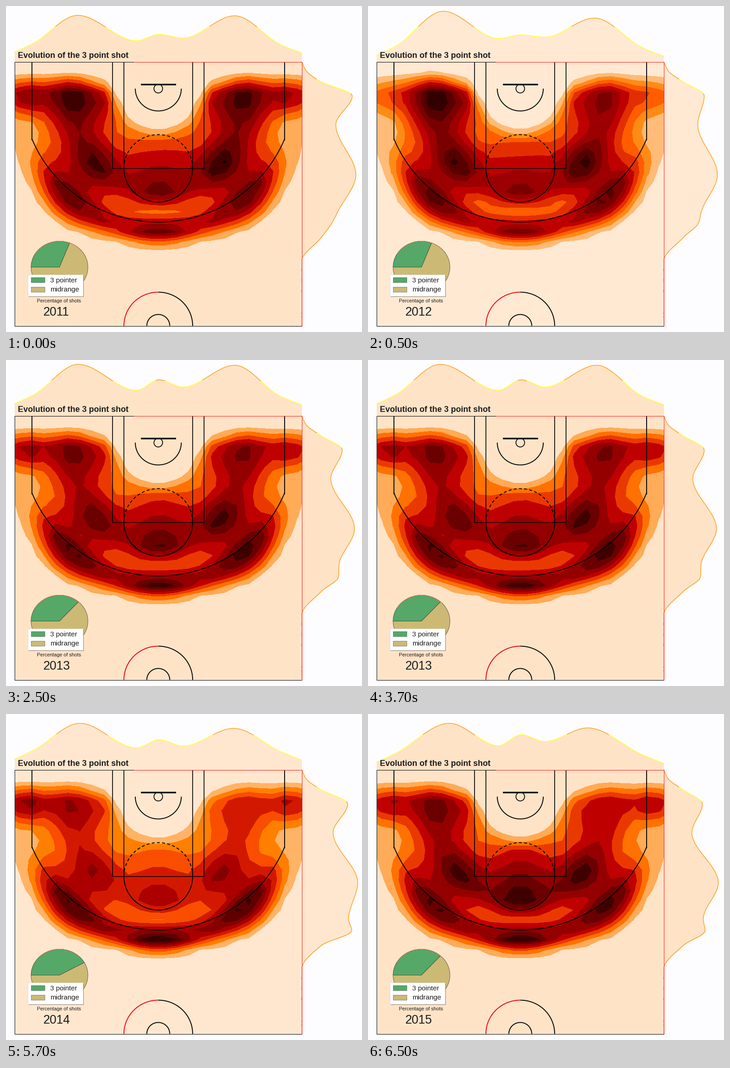
A matplotlib script for the animation above (8000 ms loop, 782x716 px).

```python
import numpy as np
import matplotlib.pyplot as plt
from matplotlib.animation import FuncAnimation
from matplotlib.collections import LineCollection
from matplotlib.patches import Rectangle

W, H, DPI = 782, 716, 100
LEFT, RIGHT, TOP, BOTTOM = 18, 649, 122, 702
HOOP = (334, 181)
GREEN, TAN, INK = "#55a868", "#ccb974", "#1c1c1c"
MID_SPOTS = (8, 50, 90, 130, 172)   # angles around the hoop, 0 points left
ARC_SPOTS = (52, 90, 128)
GRID_X = 135.4 + 26.47 * np.arange(-5, 21)
GRID_Y = 190 + 21.8 * np.arange(-4, 19)

plt.rcParams["font.family"] = "Liberation Sans"

# mid, arc: heights of the hot spots from left to right, in colour bands
# corners: heights beside the two baselines; split: angle of the pie's cut
# top: shoulder, peak, dip, bump, dip, peak; side: peak, dip, bulge, neck, hip
YEARS = [
    dict(bands=9, split=69, mid=(8.2, 7.9, 6.6, 8.5, 7.9), arc=(7.5, 6.7, 7.5),
         corners=(6.2, 5.6), peaks=(157, 502),
         top=(80, 20, 76, 62, 70, 21), side=(760, 724, 768, 729, 716)),
    dict(bands=11, split=69, mid=(10.6, 9.7, 7.5, 10.2, 7.8), arc=(9.4, 7.8, 9.2),
         corners=(4, 4), peaks=(165, 497),
         top=(87, 11, 71, 63, 68, 26), side=(738, 724, 767, 732, 726)),
    dict(bands=9, split=48, mid=(6.8, 7.2, 7.2, 7.9, 6.6), arc=(7.9, 7.8, 8.3),
         corners=(5.8, 5.2), peaks=(158, 502),
         top=(75, 9, 66, 43, 59, 11), side=(738, 713, 765, 731, 730)),
    dict(bands=10, split=29, mid=(6.5, 6.6, 5.9, 6.7, 5.2), arc=(8.9, 9.2, 9.1),
         corners=(6.9, 5.6), peaks=(162, 500),
         top=(78, 20, 74, 56, 70, 31), side=(750, 718, 772, 752, 759)),
    dict(bands=9, split=48, mid=(7, 7.9, 8.2, 8.1, 5.2), arc=(7.9, 8.2, 8.1),
         corners=(5.3, 5.2), peaks=(178, 482),
         top=(85, 20, 69, 45, 60, 30), side=(734, 711, 769, 736, 740)),
]


def ridge(angle, angles, heights, saddle=1):
    """Height along a ridge of spots that sags to `saddle` between them."""
    steps = np.arange(len(angles))
    pos = np.interp(angle, angles, steps)
    sag = 1 - (1 - saddle) * np.sin(np.pi * pos) ** 2
    return np.interp(pos, steps, heights) * sag


def density(year, x, y):
    """Shot density in colour bands: nested ridges around the hoop."""
    dx, dy = HOOP[0] - x, y - HOOP[1]
    r = np.hypot(dx, dy)
    angle = np.degrees(np.arccos(dx / r))
    side = min(angle, 180 - angle)
    a = np.radians(angle)
    s, c = np.sin(a), abs(np.cos(a))

    mid = ridge(angle, MID_SPOTS, year["mid"], 0.76)
    inner = ridge(angle, MID_SPOTS, year["mid"])
    inner *= 0.59 + 0.16 * np.cos(4 * a) + 0.1 * np.cos(2 * a)
    arc = ridge(angle, ARC_SPOTS, year["arc"], 0.75)
    arc *= np.exp(-(max(0, 52 - side) / 23) ** 2)
    arc += year["corners"][int(dx < 0)] * np.exp(-(max(0, side - 3) / 9) ** 2)
    dip = (0.36 + 0.42 * c) * (mid + arc) / 2

    rim = 346 + 20 * np.exp(-((side - 52) / 14) ** 2) + 60 * np.exp(-(side / 8) ** 2)
    radii = [75, 93, 114, 150, 188 + 39 * s ** 1.5, 245 + 27 * s, 286 + 29 * s,
             rim, rim + 28]
    value = np.interp(r, radii, [0, 1, 0.77 * inner, inner, mid, dip, arc, 1, 0])
    start = 195 + 0.2 * max(0, 185 - r)
    return value * np.exp(-0.5 * (max(0, start - y) / 24) ** 2)


def smooth(x, y, t):
    """Monotone cubic curve, level at every peak and valley."""
    x, y = np.asarray(x, float), np.asarray(y, float)
    d = np.diff(y) / np.diff(x)
    same = d[:-1] * d[1:] > 0
    total = np.where(same, d[:-1] + d[1:], 1)
    slope = np.r_[d[0], np.where(same, 2 * d[:-1] * d[1:] / total, 0), d[-1]]
    i = np.clip(np.searchsorted(x, t) - 1, 0, len(x) - 2)
    h = x[i + 1] - x[i]
    u = (t - x[i]) / h
    return ((1 + 2 * u) * (1 - u) ** 2 * y[i] + u * (1 - u) ** 2 * h * slope[i]
            + u * u * (3 - 2 * u) * y[i + 1] + u * u * (u - 1) * h * slope[i + 1])


def ellipse(cx, cy, rx, ry, start, end):
    a = np.radians(np.linspace(start, end, 90))
    return cx + rx * np.cos(a), cy - ry * np.sin(a)


def stroke(x, y, width=1.9, color="black", **style):
    ax.plot(x, y, color=color, lw=width * 0.72, solid_capstyle="butt", **style)


def box(x0, y0, x1, y1, **style):
    ax.add_patch(Rectangle((x0, y0), x1 - x0, y1 - y0, **style))


def label(x, y, text, size, **style):
    ax.text(x, y, text, fontsize=size * 0.72, color=INK, va="baseline", **style)


def draw_marginals(year, paper):
    left, right = year["peaks"]
    shoulder = year["top"][0]
    x = np.linspace(LEFT, RIGHT, 316)
    y = smooth([LEFT, 62, left, 286, 336, 388, right, 600, RIGHT],
               [shoulder + 21, *year["top"], shoulder + 3, shoulder + 23], x)
    v = np.linspace(TOP, BOTTOM, 291)
    u = smooth([TOP, 142, 165, 197, 260, 370, 450, 475, 508, 560, BOTTOM],
               [RIGHT, 659, 690, *year["side"], 692, RIGHT, RIGHT], v)
    ax.fill_between(x, y, TOP, color=paper, lw=0)
    ax.fill_betweenx(v, RIGHT, u, color=paper, lw=0)
    for px, py, yellow in ((x, y, y > 45), (u, v, (v > 158) & (v < 192))):
        points = np.column_stack([px, py])
        ax.add_collection(LineCollection(
            np.stack([points[:-1], points[1:]], axis=1), linewidths=1.1,
            colors=np.where(yellow[:-1], "#ffff1e", "#ff9c10")))


def draw_heat(year, cmap):
    n = year["bands"]
    field = np.array([[density(year, x, y) for x in GRID_X] for y in GRID_Y])
    colors = [cmap((k + 0.5) / n) for k in range(1, n)]
    heat = ax.contourf(GRID_X, GRID_Y, np.minimum(field, n - 0.01),
                       levels=np.arange(1, n + 1), colors=colors)
    heat.set_clip_path(Rectangle((LEFT, TOP), RIGHT - LEFT, BOTTOM - TOP,
                                 transform=ax.transData))


def draw_court():
    cx, cy = HOOP
    for x in (56, 611):
        stroke([x, x], [TOP, 294])
    for x in (233, 258, 409, 434):
        stroke([x, x], [TOP, 356], 1.7)
    stroke([233, 434], [356, 356], 1.5)
    stroke([295, 372], [171, 171], 3.4)
    stroke(*ellipse(cx, cy, 9.5, 9.5, 0, 360), 1.7)
    stroke(*ellipse(cx, cy, 50.5, 49, 180, 360))
    stroke(*ellipse(cx, cy, 299.6, 293, 202, 338))
    stroke(*ellipse(cx, 356, 75.5, 74, 180, 360))
    stroke(*ellipse(cx, 356, 75.5, 74, 0, 180), dashes=(3.4, 2.6))
    stroke(*ellipse(cx, BOTTOM, 75.5, 74, 0, 90))
    stroke(*ellipse(cx, BOTTOM, 75.5, 74, 90, 180), color="#f00010")
    stroke(*ellipse(cx, BOTTOM, 25.2, 25, 0, 180))
    stroke([280, LEFT, LEFT, RIGHT], [TOP, TOP, BOTTOM, BOTTOM], 1)
    stroke([280, RIGHT, RIGHT], [TOP, TOP, BOTTOM], 1, "#ff1010")


def draw_pie(split):
    cx, cy = 117, 573
    for start, end, color in ((180, split, GREEN), (split, -180, TAN)):
        x, y = ellipse(cx, cy, 62.5, 57, start, end)
        ax.fill(np.append(x, cx), np.append(y, cy), fc=color, ec="#333333", lw=0.5)
    stroke(*ellipse(cx, cy, 62.5, 57, 150, 45), 0.9, "#f07050")

    box(49, 591, 170, 638, fc="#7a6a60", alpha=0.65, lw=0)
    box(47, 589, 168, 636, fc="white", ec="#dddddd", lw=0.6)
    for y, color, text in ((595, GREEN, "3 pointer"), (616, TAN, "midrange")):
        box(54, y, 84, y + 11, fc=color, ec="#444444", lw=0.4)
        label(96.5, y + 11, text, 15.2)


def draw(i):
    index = (i + 3) // 4    # the first year shows for one step, then four each
    year = YEARS[index]
    cmap = plt.get_cmap("gist_heat_r")
    paper = cmap(0.5 / year["bands"])
    ax.clear()
    ax.set(xlim=(-0.5, W - 0.5), ylim=(H - 0.5, -0.5))
    ax.axis("off")
    draw_marginals(year, paper)
    box(LEFT, TOP, RIGHT, BOTTOM, fc=paper, lw=0)
    draw_heat(year, cmap)
    draw_court()
    draw_pie(year["split"])
    label(25.5, 113.5, "Evolution of the 3 point shot", 18, weight="bold")
    label(68, 650.5, "Percentage of shots", 10.8)
    label(81.5, 679.5, str(2011 + index), 26.6)
    return []


fig = plt.figure(figsize=(W / DPI, H / DPI), dpi=DPI, facecolor="#fdfdff")
ax = fig.add_axes([0, 0, 1, 1])
anim = FuncAnimation(fig, draw, frames=16, interval=500, repeat=True,
                     repeat_delay=0, init_func=lambda: [])
plt.show()
```
